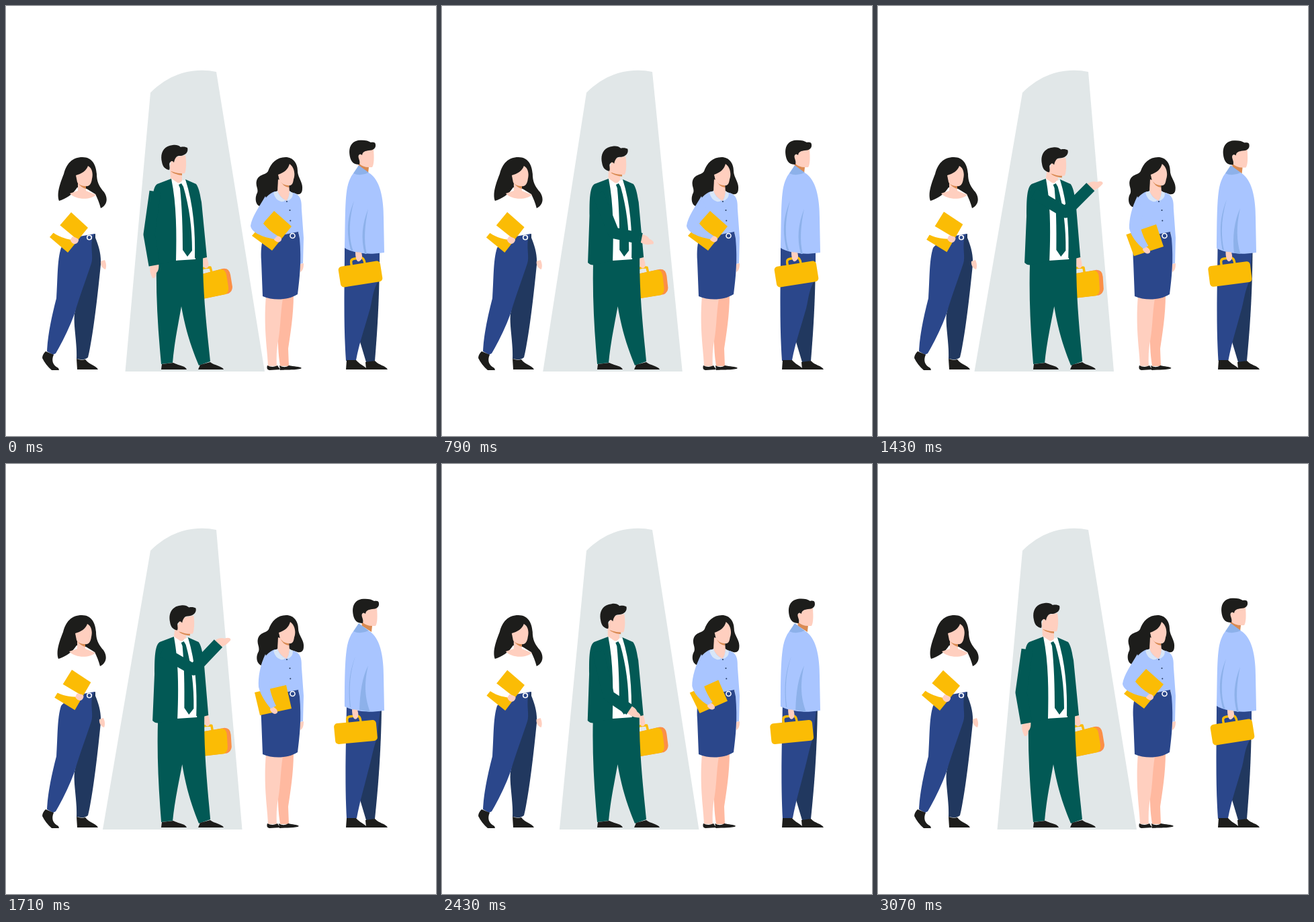
An HTML page that plays this animation: 640 by 640 pixels, repeating every 3.57 s.

```html
<!DOCTYPE html>
<html lang="en">
<head>
<meta charset="utf-8">
<title>People in a queue</title>
<style>
  html, body { margin: 0; height: 100%; overflow: hidden; background: #fff; }
  svg { display: block; width: 100vw; height: 100vh; }
  .ink { fill: #1d1d1b; }
  .skin { fill: #ffcfbf; }
  .tan { fill: #d98a52; }
  .gold { fill: #fbbc05; }
  .green { fill: #025955; }
  .navy { fill: #2b478b; }
  .dark { fill: #21385f; }
  .sky { fill: #a9c5ff; }
  .shade { fill: #8db1ea; }
  .white { fill: #fff; }
  .line { fill: none; stroke-linejoin: round; }
  .handle { stroke: #fbbc05; stroke-width: 3.5; }
  .buckle { fill: none; stroke: #fff; stroke-width: 1.6; }
</style>
</head>
<body>
<svg viewBox="0 0 640 640">
  <path id="beam" fill="#e1e7e8"/>

  <g id="womanA">
    <path class="dark" d="M126 341L133 339V345C138 357 142 370 141 385C137 425 130 490 122 523Q117 528 105 525C106 500 100 475 102 458Z"/>
    <path class="navy" d="M82 360C88 352 94 356 104 344L132 339L128 348C126 360 130 374 127 383C121 402 110 430 102 458C94 480 84 500 74 517L70 519L61 514C62 490 68 462 75 435C77 408 76 378 82 360Z"/>
    <circle class="buckle" cx="124" cy="344.5" r="3.3"/>
    <path class="ink" d="M59 514L71 519C67 528 70 535 78 539L79 542H68C62 537 57 530 54 524C54 520 56 517 59 514Z"/>
    <path class="ink" d="M105 525Q112 528 118 526C124 534 134 535 137 541H106Z"/>
    <path id="handA" class="skin" d="M141 380L147 378C149 383 150 387 148 392C144 391 140 386 141 380Z"/>
    <g id="headA">
      <path class="ink" d="M79 290C75 280 80 265 86 250C90 235 98 225 114 225C128 225 134 236 135 250C135 262 139 269 146 277C152 286 151 296 141 301C139 293 136 286 133 280L120 272L106 270C100 280 89 287 79 290Z"/>
      <path class="skin" d="M95 279L107 275V262L119 266V275L134 281C126 289 104 289 95 279Z"/>
      <path class="tan" d="M106 262L119 268V272Q111 270 106 262Z"/>
      <path class="skin" d="M104 252C112 250 120 245 122 238C128 241 130 249 128 257C127 266 123 269 119 268C113 268 108 266 106 262Z"/>
    </g>
    <g id="folderA">
      <path class="gold" d="M97 307L122 330L92 367L65 344Z"/>
      <path class="white" d="M72 317L80 326L104 346L97 348C88 346 78 344 66 334Z"/>
      <path class="skin" d="M99 343C104 345 109 346 108 349C107 353 103 356 99 353C96 350 95 348 97 346Z"/>
    </g>
  </g>

  <g id="womanB">
    <path fill="#ffb9a0" d="M410 435L428 430C428 460 423 490 420 510L421 536H408C404 510 403 480 410 435Z"/>
    <path class="skin" d="M387 431L412 435C408 460 409 480 404 505Q402 520 403 536H390C389 510 383 480 387 431Z"/>
    <path class="ink" d="M389 535C394 538 401 537 404 535L408 541L392 542C388 541 388 538 389 535Z"/>
    <path class="ink" data-by="b" d="M407 535C412 538 417 538 421 535C428 537 437 536 440 539C436 542 420 541 408 542Z"
      data-to="M406 535C411 538 415 538 420 535C426 537 433 536 436 539C432 542 416 541 407 542Z"/>
    <path class="ink" data-by="b" d="M378 298C371 296 370 285 374 278C376 272 371 268 373 260C376 250 386 252 390 246C394 234 403 225 416 225C428 225 434 235 434 245C434 255 442 262 441 272C441 278 438 281 433 280L410 272C400 278 388 290 378 298Z"
      data-to="M381 300C373 298 371 287 376 279C378 272 373 268 375 260C378 250 387 252 391 246C395 234 404 225 417 225C429 225 435 235 435 245C435 255 444 262 443 272C443 278 440 281 434 280L411 272C401 278 388 292 381 300Z"/>
    <path class="sky" d="M400 276L428 278C440 282 440 292 440 303L443 345L442 383L438 384L436 337L385 344L380 300C384 286 390 280 400 276Z"/>
    <path class="skin" d="M438 384L443 383C443 389 442 394 438 396Z"/>
    <path class="navy" d="M384 343C380 352 379 365 380 380L382 432C398 439 420 438 434 429C437 405 440 380 437 346L435 336L410 341Z"/>
    <circle class="buckle" cx="426.5" cy="342" r="3.5"/>
    <path class="skin" d="M405 258L421 264L422 277Q421 287 417 290Q408 285 404 276Z"/>
    <path fill="#d8e6f8" d="M398 278L404 275Q407 285 416 289Q413 292 409 291Q401 289 398 278ZM422 275L427 279Q427 288 418 290Q422 283 422 275Z"/>
    <path class="tan" d="M408 259L421 266V270Q412 269 408 259Z"/>
    <path id="faceB" class="skin" d="M405 251C414 248 420 243 422 235C429 240 431 250 428 258C427 266 424 268 420 267C413 267 410 263 407 260Z"/>
    <g class="dark"><circle cx="418" cy="291" r="1"/><circle cx="422.5" cy="304" r="1"/><circle cx="423.3" cy="319.5" r="1"/></g>
    <path class="gold" data-by="b" d="M399 305L425 328L396 364L366 342Z" data-to="M417 329L425 364L378 374L370 340Z"/>
    <path class="skin" data-by="b" d="M400 343C405 341 411 344 410 348C408 352 404 353 399 348Z" data-to="M394 361C399 360 405 366 404 370C401 373 397 373 393 366Z"/>
    <path class="sky" data-by="b" d="M386 283C376 300 366 314 364 327C365 336 378 343 399 347L404 342C396 337 390 332 383 324L394 304Z"
      data-to="M386 283C378 300 375 318 376 332C379 344 387 356 394 364L402 360C398 352 394 342 392 330L395 306Z"/>
  </g>

  <g id="manB">
    <path class="dark" data-by="c" d="M530 366L556 366C556 430 553 480 549 528Q543 531 536 530L527 500Z"
      data-to="M532 366L559 366C558 430 554 480 549 528Q543 531 536 530L527 500Z"/>
    <path class="navy" data-by="c" d="M504 358L556 366L555 408C544 425 546 440 540 457C532 485 525 505 521 527L506 528C502 470 504 420 504 358Z"
      data-to="M507 358L557 366L552 408C546 425 544 440 539 457C532 485 526 505 522 527L507 528C504 470 506 420 507 358Z"/>
    <path class="ink" d="M507 527H521C526 533 532 535 536 539V541H506Z"/>
    <path class="ink" d="M535 530L549 528C555 535 565 535 568 541H536Z"/>
    <g id="headB">
      <path class="skin" d="M529 217L547 213C548 225 548 236 545 240H539V246L524 240V224Z"/>
      <path class="tan" d="M525 234Q531 240 540 240L539 249L525 240Z"/>
      <path class="ink" d="M513 228C509 215 511 203 524 200C532 199 539 200 543 203C547 202 550 203 550 206C551 212 546 215 540 215C535 216 531 216 530 222Q527 219 525 222C523 226 528 230 526 236C517 236 515 232 513 228Z"/>
    </g>
    <path class="sky" data-by="c" d="M518 248C530 244 540 246 546 253C558 265 562 290 562 315L563 367L554 368C540 370 515 368 504 360C505 330 504 290 508 270C510 260 514 252 518 248Z"
      data-to="M518 248C530 244 540 246 546 253C558 265 562 290 562 315L563 367L554 368C540 370 518 368 504 361C504 330 504 290 508 270C510 260 514 252 518 248Z"/>
    <path class="shade" d="M517 249L525 237L540 248Q527 254 517 249Z"/>
    <path class="shade" data-by="c" d="M518 290C508 315 506 335 513 363L517 365C509 345 511 315 518 290Z"
      data-to="M520 286C511 310 509 330 512 362L513 362C510 332 512 310 520 286Z"/>
    <path class="shade" data-by="c" d="M539 302C530 325 528 345 534 369L537 369C532 350 534 325 539 302Z"
      data-to="M539 300C530 318 527 340 526 366L542 369C535 350 532 330 539 300Z"/>
    <g id="bagB">
      <rect class="gold" x="-31.5" y="-15.5" width="63" height="31" rx="5"/>
      <path class="line handle" d="M-11 -14V-19Q-11 -24 -6 -24H4Q9 -24 9 -14"/>
    </g>
    <path class="skin" data-by="c" d="M520 366L529 367C531 373 530 377 527 379C523 383 520 377 520 366Z"
      data-to="M515 365L523 366C525 372 525 377 522 379C518 382 515 376 515 365Z"/>
  </g>

  <g id="manA">
    <g id="bagA">
      <path fill="#fb8f47" d="M288 400L322 391Q332 389 334 400L337 418Q337 425 331 428L288 437Z"/>
      <path class="gold" d="M288 400L319 392Q326 391 328 400L331 418Q332 426 327 429L288 437Z"/>
      <path class="line handle" stroke-width="3" d="M292 391Q296 389 304 389L306 396"/>
    </g>
    <path class="skin" d="M292 374L298 372C302 382 303 389 299 390C295 392 292 385 292 374Z"/>
    <path class="green" d="M224 380L293 374C293 430 299 480 304 529L287 535C272 500 265 470 261 447C256 475 250 505 248 531L231 533C226 480 223 430 224 380Z"/>
    <path class="white" d="M245 257L268 260C280 300 281 340 282 377L252 379C254 340 252 290 245 257Z"/>
    <path class="skin" data-by="a" d="M244 236L262 240L262 261Q254 267 245 258Z" data-to="M248 238L264 242L264 262Q254 266 246 259Z"/>
    <path class="white" d="M245 256L258 265L262 260L267 259L268 270L262 265L255 272Z"/>
    <path class="green" d="M257 266L261 264L264 269C273 300 277 330 277 364L270 373L263 363C263 330 262 300 259 271Z"/>
    <path class="green" d="M246 257L225 265C217 270 218 295 218 312L216 382Q221 387 227 385L253 379C254 340 254 295 246 257Z"/>
    <path class="green" d="M267 258L283 265C288 272 289 283 291 292L299 374L291 376L281 375C282 335 279 295 267 258Z"/>
    <g id="headC">
      <path class="tan" d="M245 246L262 248V252Q251 251 245 246Z"/>
      <path class="skin" d="M246 226L267 222C269 233 268 245 266 249C258 250 248 248 244 244Z"/>
      <path class="ink" d="M232 232C229 220 234 208 248 207C252 206 257 207 260 210C264 209 268 210 270 211C272 218 266 223 258 223C253 223 251 228 250 233Q247 229 245 232C241 235 245 239 243 244C236 243 233 238 232 232Z"/>
    </g>
  </g>
  <path class="ink" d="M232 533L249 531C256 535 267 535 269 541H231Z"/>
  <path class="ink" d="M289 534L304 530C310 535 322 536 324 541H286Z"/>
  <path id="hand" class="skin" d="M-3 -6C3 -7 7 -7 11 -4C17 -4 20 -2 19 1C14 4 9 7 2 6L-3 6Z"/>
  <path id="sleeve" class="line" stroke="#025955" stroke-width="17"/>
</svg>
<script>
(() => {
  const LOOP = 3570, FPS = 14;
  const $ = id => document.getElementById(id);
  const move = (id, value) => $(id).setAttribute('transform', value);
  const clamp = v => Math.min(1, Math.max(0, v));

  // Sine ease from 0 to 1 between two times
  const ease = (t, a, b) => (1 - Math.cos(Math.PI * clamp((t - a) / (b - a)))) / 2;
  // Rise over a..b, fall over c..d
  const swing = (t, a, b, c, d) => ease(t, a, b) - ease(t, c, d);

  const morphs = [...document.querySelectorAll('[data-to]')].map(node => ({
    node, by: node.dataset.by, from: node.getAttribute('d'),
    to: node.dataset.to.match(/-?[\d.]+/g).map(Number)
  }));

  // Arm poses: elbow x, y, wrist x, y, hand angle
  const down = [213, 340, 221, 386, 96], loose = [217, 340, 230, 385, 92],
        low = [248, 345, 279, 366, 35], level = [266, 318, 319, 304, 4],
        high = [279, 309, 317, 275, -18], peak = [279, 306, 316, 267, -18];
  const arm = [[140, down], [500, loose], [720, low], [900, level], [1140, high],
               [1710, peak], [2140, level], [2430, low], [2680, loose], [2930, down]];

  // Monotone cubic through the arm poses
  function armValue(t, j) {
    const n = arm.length - 1;
    if (t <= arm[0][0]) return arm[0][1][j];
    if (t >= arm[n][0]) return arm[n][1][j];
    const slope = i => i < 0 || i >= n ? 0 : (arm[i + 1][1][j] - arm[i][1][j]) / (arm[i + 1][0] - arm[i][0]);
    const tangent = i => {
      const a = slope(i - 1), b = slope(i);
      return a * b > 0 ? 2 * a * b / (a + b) : 0;
    };
    const i = arm.findIndex(k => k[0] > t) - 1, h = arm[i + 1][0] - arm[i][0], u = (t - arm[i][0]) / h;
    const s = u * u * (3 - 2 * u);
    return arm[i][1][j] * (1 - s) + arm[i + 1][1][j] * s
      + h * u * (1 - u) * ((1 - u) * tangent(i) - u * tangent(i + 1));
  }

  function draw(t) {
    const shift = 34 * swing(t, 150, 1050, 1640, 2600);
    $('beam').setAttribute('d',
      `M215 129C237 107 262 97 285 96Q299 95 313 98L${385 - shift} 544H${177.5 - shift}Z`);

    const lean = swing(t, 320, 1240, 1850, 2820);
    const hold = swing(t, 600, 1400, 1818, 2690);
    const drop = swing(t, 900, 1620, 2040, 3070);
    const turn = swing(t, 1150, 1700, 2370, 2930);
    const amount = { a: lean, b: drop, c: turn };
    for (const m of morphs) {
      let i = 0;
      m.node.setAttribute('d', m.from.replace(/-?[\d.]+/g, v => +v + (m.to[i++] - v) * amount[m.by]));
    }

    move('headA', `translate(${-hold})`);
    move('handA', `translate(${-2 * hold})`);
    move('folderA', `translate(${7 * hold} ${-hold}) rotate(${-9 * hold} 95 345)`);
    move('faceB', `translate(${drop})`);
    move('headB', `translate(${5 * turn} ${turn})`);
    move('bagB', `translate(${527.5 - 7 * turn} 399) rotate(${-9 + 3.5 * turn})`);

    const skew = 0.0135 * lean;
    move('manA', `matrix(1 0 ${-skew} 1 ${540 * skew} 0)`);
    move('headC', `translate(${8 * lean} ${3.5 * lean})`);
    move('bagA', `rotate(${5 * lean} 300 388)`);

    const [ex, ey, wx, wy, angle] = down.map((_, j) => armValue(t, j));
    const raise = clamp((ex - 213) / 35);
    $('sleeve').setAttribute('d', `M${222 + 10 * raise} ${276 + 3 * raise}L${ex} ${ey}L${wx} ${wy}`);
    move('hand', `translate(${wx} ${wy}) rotate(${angle})`);
  }

  function tick() {
    const step = Math.floor((performance.now() % LOOP + 5) * FPS / 1000);
    draw(step * 1000 / FPS);
    requestAnimationFrame(tick);
  }
  tick();
})();
</script>
</body>
</html>
```
